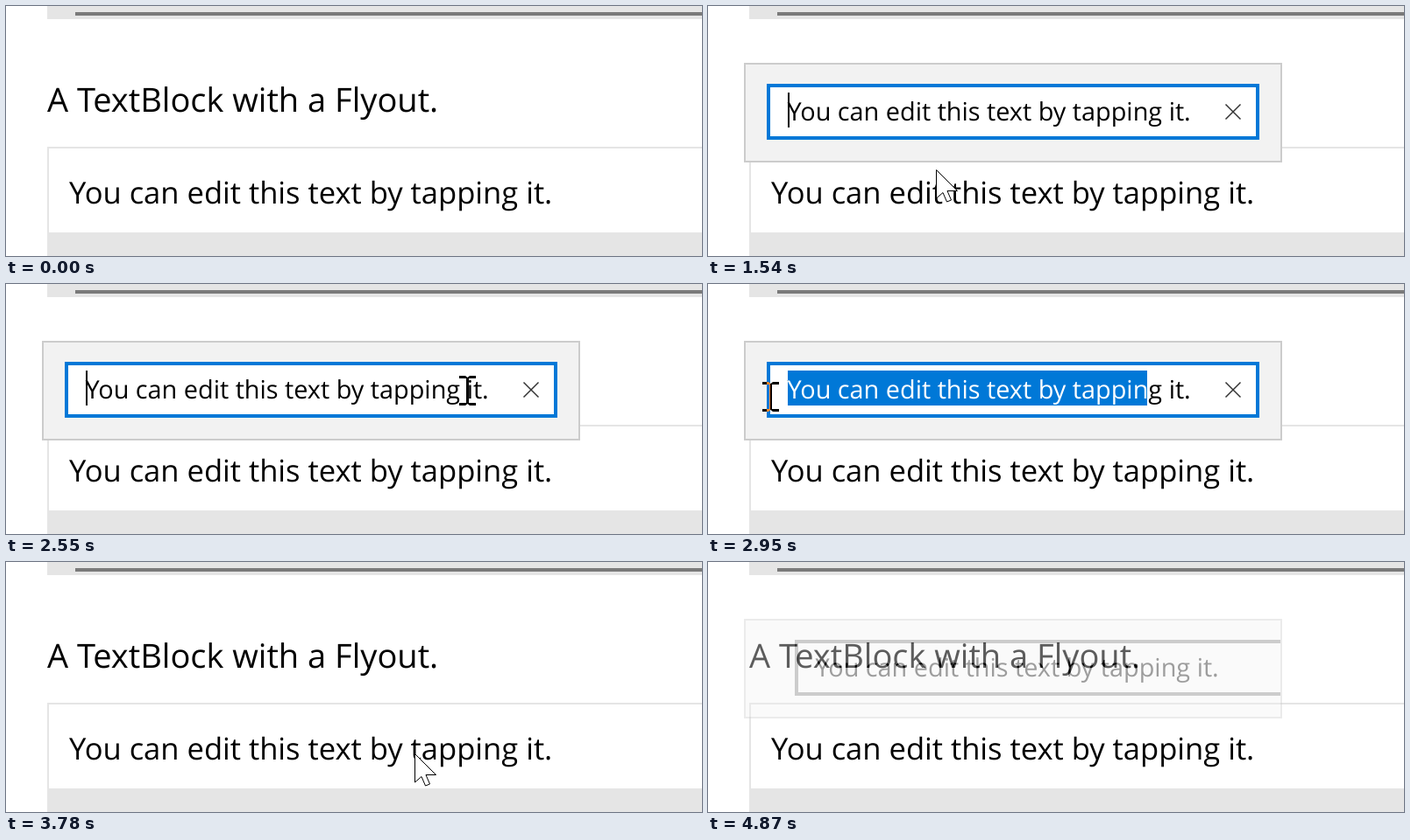
An HTML page that plays this animation: 794x286 px, repeating every 4960 ms.

```html
<!DOCTYPE html>
<html lang="en">
<head>
<meta charset="utf-8">
<title>Flyout text editing</title>
<style>
  html, body { margin: 0; width: 100%; height: 100%; overflow: hidden; background: #fff; }
  svg { display: block; }
  text { font-family: "Open Sans", "Noto Sans", sans-serif; text-rendering: geometricPrecision; }
  #field { fill: #fff; stroke: #0078d7; stroke-width: 4; }
  #clear { stroke: #333; stroke-width: 1.5; }
  #clear.hover { stroke: #0078d7; }
  #flyout.closing { opacity: .38; }
  .closing #content { transform: translateX(32px); }
  .closing #field { fill: none; stroke: #7a7a7a; }
  .closing .focus { display: none; }
  #beam { fill: #fff; mix-blend-mode: difference; }
</style>
</head>
<body>
<svg width="794" height="286" viewBox="0 0 794 286">
  <defs>
    <clipPath id="selected"><rect id="selection" y="99" height="40"/></clipPath>
    <clipPath id="panel"><rect x="43" y="67" width="610" height="110"/></clipPath>
    <text id="line" font-size="28.85">You can edit this text by tapping it.</text>
  </defs>

  <rect width="794" height="286" fill="#fff"/>
  <path fill="#e5e5e5" d="M47 0H794V15H47ZM47 161H794V163H49V259H794V286H47Z"/>
  <rect x="79" y="7" width="715" height="4" fill="#7a7a7a"/>
  <text x="47" y="121.300" font-size="38">A TextBlock with a Flyout.</text>
  <text x="72" y="226.300" font-size="34.55">You can edit this text by tapping it.</text>

  <g id="flyout">
    <rect x="42" y="66" width="612" height="112" fill="#f2f2f2" stroke="#ccc" stroke-width="2"/>
    <g clip-path="url(#panel)">
      <g id="content">
        <rect id="field" x="69" y="91" width="558" height="60"/>
        <use href="#line" x="90.500" y="131"/>
        <g class="focus">
          <rect id="caret" x="91" y="99" width="2" height="40"/>
          <g clip-path="url(#selected)">
            <rect x="91" y="99" width="410" height="40" fill="#0078d7"/>
            <use href="#line" x="90.500" y="131" fill="#fff"/>
          </g>
          <path id="clear" d="M590.5 112.5l17 17m0-17l-17 17"/>
        </g>
      </g>
    </g>
  </g>

  <path id="arrow" d="M.5.5V33L8 26.5L12.500 37L17.500 35L13 24.500H24.500Z" fill="#fff" stroke="#000"/>
  <path id="beam" d="M-9-17H-2L.5-15L3-17H10V-14H2V14H10V17H3L.5 15L-2 17H-9V14H-1V-14H-9Z"/>
</svg>
<script>
  const LOOP = 4960, STEPS = 64;
  const $ = id => document.getElementById(id);
  const show = (id, on) => $(id).style.display = on ? '' : 'none';
  const clamp = (v, min, max) => Math.max(min, Math.min(max, v));

  // Straight move between two steps; bow bends it vertically into an arc.
  const move = (from, to, x, y, bow = 0) => ({ from, to, x, y, bow });
  const entry = { x: 567, y: 268 };
  const moves = [
    move(6, 12, 347, 207, -40),  // glide onto the text
    move(19, 22, 85, 147),       // into the field
    move(23, 25, 203, 150),
    move(25, 30, 589, 145, 28),  // swing round to the clear button
    move(30, 33, 526, 122),      // back to the end of the line
    move(34, 38, 71, 129, 6),    // drag a selection
    move(39, 46, 466, 235),      // click outside
    move(47, 49, 466, 219),
    move(57, 58, 640, 262)       // leave
  ];

  function pointerAt(step) {
    let { x, y } = entry;
    for (const m of moves) {
      const k = clamp((step - m.from) / (m.to - m.from), 0, 1);
      x += (m.x - x) * k;
      y += (m.y - y) * k + m.bow * Math.sin(Math.PI * k);
    }
    return [Math.round(x), Math.round(y)];
  }

  function draw(now) {
    // The screen updates in coarse steps, slightly ahead of an even grid.
    const step = Math.min(STEPS - 1, Math.floor((now % LOOP + 25) * STEPS / LOOP));
    const [x, y] = pointerAt(step);

    const closing = step === 45 || step === 63;
    const open = step >= 15 && step <= 45 || step >= 52;
    const selecting = step >= 35 && step < 46;
    const overField = open && !closing && x > 66 && x < 629 && y > 88 && y < 153;
    const overClear = overField && x > 575;
    const beam = overField && !overClear;
    const visible = step >= 6 && step < 59;

    show('flyout', open);
    $('flyout').classList.toggle('closing', closing);
    $('clear').classList.toggle('hover', overClear);
    show('caret', !selecting);

    const left = step < 38 ? clamp(x, 91, 501) : 91;
    $('selection').setAttribute('x', left);
    $('selection').setAttribute('width', selecting ? 501 - left : 0);

    show('arrow', visible && !beam);
    show('beam', visible && beam);
    $(beam ? 'beam' : 'arrow').setAttribute('transform', `translate(${x} ${y})`);

    requestAnimationFrame(draw);
  }
  draw(0);
</script>
</body>
</html>
```
